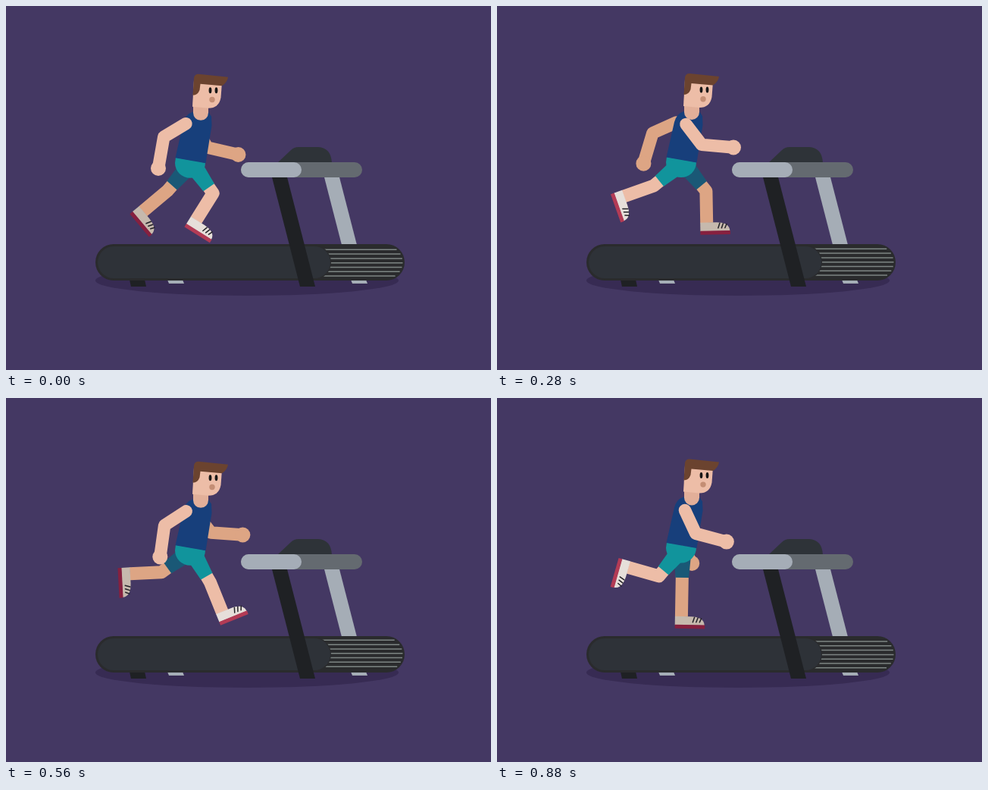
An HTML page with a canvas for the animation above (0.92 s loop, 640 px wide and 480 px high).

```html
<!DOCTYPE html>
<html lang="en">
<head>
<meta charset="utf-8">
<title>Treadmill runner</title>
<style>
html, body { margin: 0; width: 100%; height: 100%; overflow: hidden; background: #443863; }
canvas { display: block; width: 640px; height: 480px; }
</style>
</head>
<body>
<canvas id="stage" width="640" height="480"></canvas>
<script>
const ctx = document.getElementById('stage').getContext('2d');
const STEP = 40, LOOP = 920, STRIDE = 480;

// Key angles in degrees, evenly spread over one stride; 0 hangs down, positive swings forward.
const gait = {
  upper: [-59, -57, -12, 30, 38, 25],
  fore: [-10, -8, 30, 77, 86, 75],
  thigh: [35, 30, -1, -41, -54, -40],
  shin: [-32, 22, -1, -50, -87, -106]
};
const near = { skin: '#edbda7', shorts: '#11949c', shoe: '#e6dfda', sole: '#b33b55' };
const far = { skin: '#dda584', shorts: '#1a5876', shoe: '#c6b9ad', sole: '#86203f' };

const rad = deg => deg * Math.PI / 180;
const reach = ([x, y], deg, len) => [x + len * Math.sin(rad(deg)), y + len * Math.cos(rad(deg))];

// Closed Catmull-Rom curve through the keys.
function swing(keys, phase) {
  const n = keys.length, u = phase * n, i = Math.floor(u), f = u - i;
  const [a, b, c, d] = [-1, 0, 1, 2].map(j => keys[(i + j + n) % n]);
  return b + f / 2 * (c - a + f * (2 * a - 5 * b + 4 * c - d + f * (3 * (b - c) + d - a)));
}
function poseAt(phase) {
  const pose = {};
  for (const joint in gait) pose[joint] = swing(gait[joint], phase % 1);
  return pose;
}

function fillShape(color, build) {
  ctx.fillStyle = color;
  ctx.beginPath();
  build();
  ctx.fill();
}
function poly(color, ...points) {
  fillShape(color, () => points.forEach(p => ctx.lineTo(...p)));
}
function oval(color, x, y, rx, ry = rx) {
  fillShape(color, () => ctx.ellipse(x, y, rx, ry, 0, 0, 7));
}
function pill(color, x, y, w, h) {
  fillShape(color, () => ctx.roundRect(x, y, w, h, h / 2));
}
function line(color, width, cap, ...points) {
  ctx.strokeStyle = color;
  ctx.lineWidth = width;
  ctx.lineCap = cap;
  ctx.lineJoin = 'round';
  ctx.beginPath();
  points.forEach(p => ctx.lineTo(...p));
  ctx.stroke();
}
function at([x, y], deg, draw) {
  ctx.save();
  ctx.translate(x, y);
  ctx.rotate(-rad(deg));
  draw();
  ctx.restore();
}
// Parallelogram with level top and bottom edges.
function slant(color, x1, y1, x2, y2, width) {
  poly(color, [x1, y1], [x1 + width, y1], [x2 + width, y2], [x2, y2]);
}

function drawTreadmill(time) {
  oval('#372b53', 318, 362, 200, 20);
  slant('#1f2124', 163, 361, 165, 370, 20);
  slant('#a5adb6', 213, 361, 215, 366, 20);
  slant('#a5adb6', 455, 361, 457, 366, 20);
  slant('#a5adb6', 419, 222, 443, 315, 20);

  pill('#2a2b2d', 118, 314, 408, 48);
  const slide = time % 800 / 800 * 2.8;
  for (let i = 0; i < 7; i++) {
    const y = 321.3 - slide + i * 5.8;
    const end = 502 + Math.sqrt(21.5 ** 2 - (y - 338) ** 2);
    line('#7d8583', 1.5, 'butt', [410, y], [end, y]);
  }
  pill('#2a2b2d', 119, 315, 310, 46);
  pill('#2e3238', 121, 317, 307, 42);

  slant('#1f2124', 350, 222, 388, 370, 20);
  fillShape('#2e3338', () => {
    ctx.moveTo(358, 207);
    ctx.lineTo(376, 190);
    ctx.quadraticCurveTo(380, 186, 386, 186);
    ctx.lineTo(412, 186);
    ctx.quadraticCurveTo(429, 187, 430, 207);
  });
  pill('#646a70', 310, 206, 160, 20);
  pill('#a5adb7', 310, 206, 80, 20);
}

function drawShoe(side) {
  fillShape(side.shoe, () => {
    ctx.moveTo(-8.5, -0.5);
    ctx.lineTo(13, -0.5);
    ctx.bezierCurveTo(22, 0, 30, 2, 30.5, 11);
    ctx.lineTo(-8.5, 11);
  });
  ctx.fillStyle = side.sole;
  ctx.fillRect(-8.5, 10.5, 39.5, 5);
  for (let i = 0; i < 3; i++) {
    const x = 16 + i * 4.5;
    line('#222126', 1.5, 'round', [x + 1.2, 0.5 + i * 0.75], [x - 1, 7]);
  }
}

function drawLeg(side, pose, hip) {
  const knee = reach(hip, pose.thigh, 49);
  const ankle = reach(knee, pose.shin, 42);
  line(side.skin, 17, 'butt', hip, knee, ankle);
  at(ankle, pose.shin, () => drawShoe(side));
  at(hip, pose.thigh, () =>
    poly(side.shorts, [-12, 0], [12, 0], [8.8, 39.5], [-8.8, 39.5]));
}

function drawArm(side, pose, top) {
  const shoulder = [244.8 + pose.upper / 8, top + 68 - pose.upper ** 2 / 1300];
  const elbow = reach(shoulder, pose.upper, 34);
  const hand = reach(elbow, pose.fore, 42);
  line(side.skin, 16.5, 'round', shoulder, elbow, hand);
  oval(side.skin, ...hand, 10);
}

function drawTorso(top) {
  fillShape('#173f7b', () => {
    ctx.moveTo(246, top + 50);
    ctx.quadraticCurveTo(237, top + 53, 234, top + 64);
    ctx.lineTo(223.5, top + 110.5);
    ctx.lineTo(263.5, top + 117.5);
    ctx.lineTo(271.5, top + 68);
    ctx.lineTo(271, top + 56);
    ctx.lineTo(267, top + 50);
  });
}

function drawPelvis(top) {
  fillShape(near.shorts, () => {
    ctx.moveTo(224, top + 110);
    ctx.lineTo(263, top + 117);
    ctx.arc(243, top + 117, 20, 0, Math.PI);
  });
}

function drawHead(top) {
  ctx.save();
  ctx.translate(0, top);
  fillShape('#e2af99', () => ctx.roundRect(247, 38, 20, 23, [0, 0, 10, 10]));
  fillShape(near.skin, () => {
    ctx.moveTo(248, 8);
    ctx.lineTo(285, 11);
    ctx.lineTo(283.5, 31);
    ctx.quadraticCurveTo(281, 45, 267, 45);
    ctx.lineTo(246, 43);
  });
  fillShape('#6b432f', () => {
    ctx.moveTo(246.5, 28);
    ctx.lineTo(248, 5);
    ctx.quadraticCurveTo(249, 0, 254, 0);
    ctx.lineTo(293, 4);
    ctx.quadraticCurveTo(292, 11, 285, 15.5);
    ctx.lineTo(256.5, 13);
    ctx.lineTo(255.5, 21);
    ctx.quadraticCurveTo(253, 28, 246.5, 28);
  });
  oval('#171717', 269.5, 21.5, 1.9, 4);
  oval('#171717', 277.5, 21.5, 1.9, 4);
  oval('#c48e74', 272, 33.7, 3.7);
  ctx.restore();
}

function drawRunner(phase) {
  // The body bobs twice per stride.
  const top = 84.7 + 5.5 * Math.cos(4 * Math.PI * phase - 0.37);
  const hip = [245, top + 117];
  const nearPose = poseAt(phase), farPose = poseAt(phase + 0.5);
  drawArm(far, farPose, top);
  drawLeg(far, farPose, hip);
  drawLeg(near, nearPose, hip);
  drawPelvis(top);
  drawTorso(top);
  drawHead(top);
  drawArm(near, nearPose, top);
}

function render(now) {
  const time = Math.floor(now % LOOP / STEP) * STEP;
  ctx.fillStyle = '#443863';
  ctx.fillRect(0, 0, 640, 480);
  drawTreadmill(time);
  drawRunner(time % STRIDE / STRIDE);
}

const start = performance.now();
function tick() {
  render(performance.now() - start);
  requestAnimationFrame(tick);
}
tick();
</script>
</body>
</html>
```
